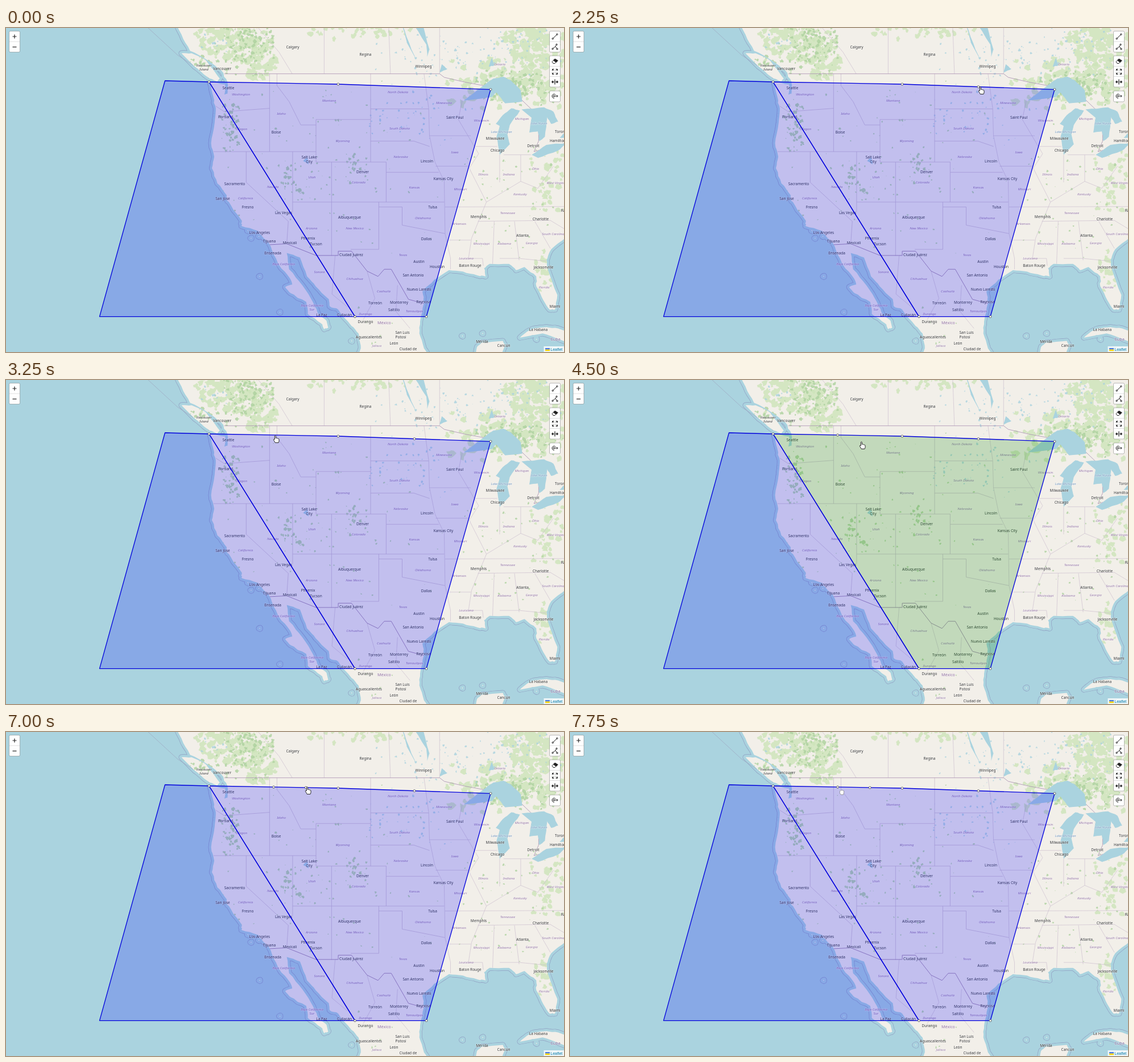
Animation, 981 px wide and 571 px high, one loop 8 s. Source, as an HTML page:

```html
<!DOCTYPE html>
<html lang="en">
<head>
<meta charset="utf-8">
<title>Map editor</title>
<style>
html, body { margin: 0; width: 100%; height: 100%; overflow: hidden; background: #aad3df; }
svg { display: block; position: absolute; left: 0; top: 0; }
text { text-anchor: middle; font-family: "Noto Sans", "Open Sans", sans-serif; }
.halo { paint-order: stroke; stroke: rgba(255,255,255,.5); stroke-width: 1.2px; stroke-linejoin: round; }
</style>
</head>
<body>
<svg id="stage" width="981" height="571" viewBox="0 0 981 571"></svg>
<script>
const stage = document.getElementById('stage');
const WATER = '#aad3df', LAND = '#f2efe9', PALE = '#cde4ba', WOOD = '#add19e';

function add(tag, attrs, parent = stage, text) {
  const node = document.createElementNS('http://www.w3.org/2000/svg', tag);
  for (const key in attrs) node.setAttribute(key, attrs[key]);
  if (text) node.textContent = text;
  return parent.appendChild(node);
}

let seed = 11;
function rnd() {
  seed = (seed * 16807) % 2147483647;
  return seed / 2147483647;
}
const spread = r => (rnd() + rnd() - 1) * r;

// Web Mercator: degrees west and north to stage pixels.
const DEG = Math.PI / 180, SCALE = 13.71;
const project = (west, north) => [
  545 + SCALE * (111.05 - west),
  235.5 + SCALE * (45.08 - Math.asinh(Math.tan(north * DEG)) / DEG),
];
const geo = s => s.trim().split(/\s+/).map(p => project(...p.split(',').map(Number)));

// Adds small natural wiggles between the given points.
function rough(pts, amp) {
  return pts.flatMap(([x, y], i) => {
    const [nx, ny] = pts[i + 1] || [x, y];
    const cuts = Math.hypot(nx - x, ny - y) > 60 ? [] : [.25, .5, .75];
    return [[x, y], ...cuts.map(k => [x + (nx - x) * k + spread(amp), y + (ny - y) * k + spread(amp)])];
  });
}
const toPath = (pts, end = '') => 'M' + pts.map(p => p.map(v => v.toFixed(1))).join('L') + end;
const regions = (list, amp) => list.split(';').map(s => toPath(rough(geo(s), amp), 'Z')).join('');
const line = (d, stroke, width, parent) => add('path', { d, fill: 'none', stroke, 'stroke-width': width, 'stroke-linejoin': 'round' }, parent);

/* ---- Land, in degrees west,north ---- */
const pacific = `129.8,54 128.3,52.2 127.2,50.9 124.9,50.1 123.2,49.3 122.4,48.3 122.4,47.3 122.8,47.2 122.7,48.1 124.7,48.35
  124.1,46.7 123.9,45.8 124.05,44.7 124.5,42.8 124.1,41.5 124.4,40.4 123.7,38.9 122.5,37.7 122.4,37.1 121.9,36.6 120.6,35.1
  120.6,34.5 118.5,34 118.3,33.7 117.2,32.8 116.6,31.7 115.8,30.3 114.4,28.8 114.1,28.1 115,27.8 114.3,27.1
  112.3,26.1 112.1,24.7 110.4,23.6 110,22.9 109.5,23.1`;
const cortez = `109.7,23.9 110.7,24.6 111.4,26 112.8,28 114.5,29.8 114.8,31.6 113.1,31.1 112.2,29 111.1,27.9 109.4,26.4
  109.3,25.6 108.2,25.2 106.5,23.3 105.6,22.4 105.3,20.6 105.6,20 105.3,19`;
const atlantic = `96.4,19.4 97.2,20.6 97.8,22.4 97.7,23.8 97.2,26 97.4,27.3 95.9,28.6 94,29.7 92.2,29.55 90.3,29.1 89.3,29
  89.5,29.9 88.8,30.4 86.3,30.4 85.4,29.7 84.3,30.05 82.8,29 82.8,27.9 81.9,26.3 81.1,25.2 80.4,25.2 80.1,26.9
  81.3,29.7 81.5,30.8 80.9,32 79,33.3 77,34.5`;
const islands = `128.3,50.7 127,50.7 125.3,50.2 124.3,49.4 123.4,48.6 123.7,48.35 125,48.75 126.6,49.6;
  84.9,21.9 84,22.6 83,23 81.5,23.15 80,23 77,22 77,20.5 79.8,21.7 82,22.4 83.4,22.2;
  90.7,19 90.4,20.8 89.8,21.3 87.1,21.5 86.8,21 87.6,19`;
const islets = geo('118.3,29 119.8,34 118.4,33.4 119.4,33.2 115.7,24.9 106.5,21.5 82.8,21.7 78.6,26.6 89.7,22.4 92.3,22.1');

const mainland = [pacific, cortez, atlantic].flatMap(s => rough(geo(s), 1.3));
const landPath = toPath([...mainland, [1020, -30]], 'Z') + regions(islands, .8)
  + islets.map(([x, y]) => `M${x - 1},${y}l2,-1v2Z`).join('');

add('rect', { width: 981, height: 571, fill: WATER });
for (const [stroke, width] of [['#8f9fc2', 10], [WATER, 8.6]])
  add('path', { d: landPath, fill: WATER, stroke, 'stroke-width': width, 'stroke-linejoin': 'round' });
line('M250,0L302,48L346,77L357,89', '#9da6c0', .7);
add('path', { d: landPath, fill: LAND });
add('path', { d: landPath }, add('clipPath', { id: 'land' }));
const cover = add('g', { 'clip-path': 'url(#land)' });

function blob(x, y, r) {
  const pts = Array.from({ length: 9 }, (_, i) => {
    const a = i * Math.PI * 2 / 9, d = r * (.4 + rnd() * .8);
    return [x + Math.cos(a) * d, y + Math.sin(a) * d];
  });
  return toPath(pts, 'Z');
}
// Fills elliptical zones "x y rx ry" with blobs; share is the covered part.
function scatter(fill, size, share, zones) {
  for (const zone of zones.split(';')) {
    const [x, y, rx, ry] = zone.trim().split(' ').map(Number);
    let d = '';
    for (let n = rx * ry * share / size ** 2; n > 0; n--)
      d += blob(x + spread(rx), y + spread(ry), size * (.3 + rnd()));
    add('path', { d, fill, opacity: .8 }, cover);
  }
}
scatter(PALE, 7, 1.4, '400 15 75 48;445 55 40 50;900 95 130 50;930 25 80 55');
scatter(PALE, 5, .5, '640 2 120 18;950 270 40 60;948 430 25 45');
scatter(WOOD, 3, .35, '425 30 60 60;900 105 90 35;393 172 22 60;491 272 14 36;612 246 18 30;518 287 16 18;340 60 24 20');
scatter(WOOD, 2, .012, '555 245 190 170;860 300 130 150;405 305 45 60;650 530 50 45');
scatter(WATER, 2, .04, '790 40 170 60;350 22 48 30;905 30 75 45;720 150 100 60');

/* ---- Lakes ---- */
const lakes = `92.1,46.7 89.6,48 88.3,48.6 87,48.75 86,48.4 84.8,47.6 84.6,46.6 86.8,46.45 87.9,47.4 88.5,47 90.8,46.8;
  87.5,41.7 87.9,43.4 87.5,44.4 88,44.6 87.1,45.4 86,46 84.9,45.8 86.2,44.5 86.5,43.6 86.2,42.7;
  84.7,45.9 81.8,46.1 80.6,45.7 80,44.8 80.9,44.6 81.4,45.2 81.7,43.4 82.4,43 82.6,43.9 83.7,43.8 83.4,45.2;
  83.4,41.7 81.5,42.65 79,42.8 80,42.1 82.6,41.4;
  79.8,43.3 79.3,43.7 77,44 77,43.3;
  96.8,50.4 96.9,51.4 99,53.5 97.6,53.5 96.5,51;98.3,50.3 98.8,51 100,53 99.4,51.6;
  95.2,49.1 94.2,49.4 94.9,49.8;112.7,41.1 112,40.8 112.2,41.6;88.9,49.6 88.2,49.7 88.5,50.3`;
add('path', { d: regions(lakes, .8), fill: WATER });

/* ---- Borders ---- */
const borders = (list, stroke, width) => list.split(';').forEach(s => line(toPath(geo(s)), stroke, width, cover));
const STATE = '#c6b7c9', NATION = '#a78fb0';
const western = `117,49 117,42;124.2,42 111.05,42;104.05,45 111.05,45 111.05,41 102.05,41 102.05,37;104.05,49 104.05,41;
  104.05,45.95 96.6,45.95;104.05,43 98.5,43 96.5,42.5;109.05,41 109.05,31.3;114.05,42 114.05,36;114.05,37 94.6,37;
  102.05,40 95.3,40;120,42 120,39 114.6,35 114.8,32.6;103,37 103,32 106.6,32;103,36.5 100,36.5 100,34.6 94.5,33.7;
  123.9,46.2 122.8,45.7 119,45.9 117,46;116.05,49 116.05,48 114.5,46.6 113,44.5 111.05,44.5`;
const eastern = `97.2,49 96.6,46 96.5,43.5 91.2,43.5;96.5,43.5 95.8,41 94.6,39.1 94.5,33.7 93.8,31 93.8,29.8;
  92.3,46.7 92.8,45 90.2,41.8 91.4,40.4 89.2,37 91.1,33.2 91.5,31 89.7,31 89.6,30.2;95.7,40.6 91.5,40.6;94,33 91.2,33;
  90.6,42.5 87.8,42.5;87.5,41.7 87.5,39;84.8,41.7 84.8,39.1;87,41.7 83.5,41.7;89.2,37 84.8,39.1 82.6,38.4 80.6,40.6;
  94.5,36.5 76,36.55;90.3,35 81,35.1 78.6,33.9;88.2,35 88.4,30.4;85.6,35 85,30.8;87.5,31 85,31 81.5,30.7;83,35 81,32.1`;
const outer = `120,53.8 115.8,50.8 114.1,49;110,54 110,49;101.5,49 101.8,54;95.2,49 95.2,52.8;
  108.6,31.3 109,27 107,25.5;104.5,29.6 103.5,26.5 105,24;100.6,28 100.8,25 99,23`;
borders(western, STATE, .7);
borders(eastern, STATE, .6);
borders(outer, STATE, .6);
borders('122.8,49 95.2,49 94.6,48.7 92,48.3 89.6,48 88.4,48.3 84.9,46.9 82.5,45.3 82.5,43 83.1,42 79,42.8', NATION, .8);
borders('117.1,32.5 114.8,32.6 111.05,31.33 108.2,31.33 108.2,31.8 106.5,31.8 104.5,29.6 103.1,29 102.3,29.8 101.4,29.8 99.2,26.4 97.2,25.9', NATION, 1);

/* ---- Labels ---- */
function labels(list, attrs) {
  for (const entry of list.split(';')) {
    const [, name, x, y] = entry.trim().match(/^(.+) (\S+) (\S+)$/);
    add('text', { x, y: +y + 2.3, class: 'halo', ...attrs }, stage, name);
  }
}
const italic = (fill, size) => ({ fill, 'font-size': size, 'font-style': 'italic' });
labels(`Washington 413 117;Oregon 414 178;Idaho 484 151;Montana 568 128;North Dakota 689 113;South Dakota 692 177;
  Minnesota 770 132;Wisconsin 836 163;Michigan 907 160;Ontario 868 64;Wyoming 592 199;Nebraska 694 227;Iowa 789 219;
  Utah 538 263;Colorado 620 272;Nevada 469 280;California 421 300;Kansas 718 281;Missouri 799 284;Illinois 839 258;
  Indiana 884 258;Ohio 931 248;Kentucky 904 293;Tennessee 882 326;West Virginia 968 273;Oklahoma 733 335;
  Arkansas 797 345;Arizona 537 353;New Mexico 613 353;Texas 698 400;Mississippi 836 380;Alabama 876 380;Georgia 924 379;
  South Carolina 962 363;Louisiana 809 406;Florida 946 457;Baja California 488 416;Baja California 538 489;Sur 538 496;
  Sonora 551 430;Chihuahua 613 442;Coahuila 664 464;Tamaulipas 718 499;Durango 632 504;Jalisco 652 560`, italic('#8f6f9f', 6));
labels('Lake Michigan 871 183;Lake Huron 937 168', italic('#6f93bb', 5.8));
labels('Vancouver 348 66;Island 348 73', italic('#333', 5.8));
labels('México 665 520;Cuba 966 549', { fill: '#8d6b9d', 'font-size': 7.2 });
labels(`Calgary 504 34;Regina 632 46.5;Winnipeg 734 68;Vancouver 380 72;Seattle 391 106;Portland 386 157;Boise 475 184;
  Salt Lake 533 228;City 533 236;Denver 627 254;Sacramento 402 275;San Jose 381 301;Fresno 425 316;Las Vegas 488 326;
  Los Angeles 446 361;Tijuana 463 376;Mexicali 499 379;Ensenada 469 397;Phoenix 531 371;Tucson 545 381;
  Albuquerque 604 334;Ciudad Juárez 607 400;Lincoln 740 235;Kansas City 769 266;Tulsa 750 316;Dallas 739 372;
  Austin 726 412;Houston 758 421;San Antonio 716 436;Nuevo Laredo 726 461;Monterrey 691 484;Reynosa 734 483;
  Saltillo 682 497;Torreón 649 485;Durango 632 518;La Paz 555 506;Culiacán 595 506;Aguascalientes 638 545;
  San Luis 697 537;Potosí 694 545;León 682 556;Ciudad de 707 566;Saint Paul 789 158;Milwaukee 860 195;Chicago 864 216;
  Detroit 927 208;Toronto 977 183;Hamilton 970 199;Memphis 831 333;Charlotte 940 337;Atlanta 908 366;Raleigh 987 322;
  Baton Rouge 816 419;Jacksonville 945 422;Miami 965 491;La Habana 936 532;Mérida 837 553;Cancún 875 560`,
  { fill: '#333', 'font-size': 6.5 });

/* ---- Editable shapes ---- */
const NW = [357, 95], MID = [584, 99], NE = [852, 108.3], SE = [739, 508.7], SW = [613.5, 508.7];
const shape = pts => add('polygon', { points: pts.join(' '), fill: '#00f', 'fill-opacity': .2, stroke: '#0000dc', 'stroke-width': 1.3, 'stroke-linejoin': 'round' });
const vertex = ([x, y]) => add('rect', { x: x - 1.8, y: y - 1.8, width: 3.6, height: 3.6, rx: 1.3, fill: '#fff', stroke: '#444', 'stroke-width': .8 });
const between = (a, b) => a.map((v, i) => (v + b[i]) / 2);

shape([[279.5, 93], NW, SW, [164.5, 508.7]]);
const area = shape([NW, MID, NE, SE, SW]);
[NW, MID, NE, SE, SW].forEach(vertex);
const half = between(NW, MID);
const inserted = [[1750, between(MID, NE)], [3500, half], [6000, between(half, MID)]]
  .map(([time, at]) => ({ time, node: vertex(at) }));

/* ---- Controls ---- */
function bar(x, y, cells) {
  add('rect', { x: x - .5, y: y - .5, width: 19, height: cells * 18 + 1, rx: 2, fill: '#fff', stroke: 'rgba(0,0,0,.25)' });
  for (let i = 1; i < cells; i++) line(`M${x},${y + i * 18}h18`, '#ccc', .6);
}
function icon(x, y, d, dots = [], width = 1) {
  const g = add('g', { transform: `translate(${x} ${y})`, fill: 'none', stroke: '#222', 'stroke-width': width });
  add('path', { d }, g);
  for (const [cx, cy] of dots) add('circle', { cx, cy, r: 1.2, fill: '#fff' }, g);
  return g;
}
bar(6, 6, 2);
bar(956, 6, 2);
bar(956, 49.5, 3);
bar(956, 111.5, 1);
icon(15, 15, 'M-3.5,0h7M0,-3.5v7', [], 1.2);
icon(15, 33.5, 'M-3.5,0h7', [], 1.2);
icon(965, 15, 'M-3.5,3.5l7,-7', [[-3.8, 3.8], [3.8, -3.8]]);
icon(965, 33, 'M-4,3.5L1,-.5L3,-4M1,-.5L4,4', [[-4, 3.8], [3, -3.8], [4, 4]]);
const eraser = icon(965, 58.5, 'M-5,1L0,-4L5,-1L0,4H-3Z');
add('path', { d: 'M0,-4L5,-1L2,2L-2.5,-1.5Z', fill: '#222' }, eraser);
const frame = icon(965, 77, '');
for (let turn = 0; turn < 360; turn += 90)
  add('path', { d: 'M-4.5,-1.5v-3h3M-4,-4l2.5,2.5', transform: `rotate(${turn})` }, frame);
icon(965, 95, 'M0,-4.5v9M-5,0h3.5M1.5,0h3.5M-3.2,-2l-2,2l2,2M3.2,-2l2,2l-2,2', [], 1.3);
icon(965, 120, 'M-1,3.6A3.6,3.6 0 1 1 1.5,-2M-1.5,0H5M3.2,-2l2,2l-2,2', [[-1.8, 0]]);

add('rect', { x: 945.5, y: 561, width: 36, height: 10, fill: '#fff', opacity: .8 });
add('rect', { x: 948, y: 564, width: 8, height: 2.6, fill: '#4c7be1' });
add('rect', { x: 948, y: 566.6, width: 8, height: 2.6, fill: '#ffd500' });
add('text', { x: 967.8, y: 569, fill: '#0078a8', 'font-size': 7, style: 'font-family: "Liberation Sans", Arial, sans-serif' }, stage, 'Leaflet');

/* ---- Pointer ---- */
const cursor = add('g', { stroke: '#111', 'stroke-width': .9, 'stroke-linejoin': 'round', fill: '#fff' });
const hand = add('path', { d: 'M-2.6,1V-5.5Q-1.6,-7 -.6,-5.5V-1.5Q.6,-2.4 1.4,-1.2Q2.6,-1.8 3.3,-.6Q4.8,-1 5,.6V3.5Q4.8,5 4,6.5H-1.8Q-2.4,4.8 -4.6,1.6Q-4.9,0 -3.4,.2Z' }, cursor);
const fist = add('path', { d: 'M-3,-2.4Q-2.2,-4 -1.2,-3Q-.3,-4.2 .7,-3Q1.8,-3.9 2.4,-2.6Q3.8,-2.8 3.6,-.8Q3.6,1.6 2.4,4.5H-1.8Q-4,1.8 -3.8,.2Z', stroke: '#666', 'stroke-width': .6 }, cursor);

// Stops of the pointer: time, x, y, and the sag of the way leading there.
const stops = [
  [250, 930, 118, 0], [1250, 724, 111, 8], [1500, 723, 110, 0], [2250, 723, 110, 0], [3250, 475, 104, 14],
  [4000, 475, 104, 0], [4500, 514, 115, 0], [5750, 531, 103, 3], [7000, 531, 103, 0], [7750, 478, 106, 4],
];
const STEP = 250, GRAB = 7750;

function pointer(t) {
  const i = stops.findIndex(s => s[0] >= t);
  const [t1, x1, y1, sag] = stops[i], [t0, x0, y0] = stops[Math.max(i - 1, 0)];
  const k = t1 > t0 ? (t - t0) / (t1 - t0) : 1;
  const ease = k * (2 - k);
  return [x0 + (x1 - x0) * ease, y0 + (y1 - y0) * ease + sag * Math.sin(Math.PI * k)];
}
// The finger tip must lie below the upper edge of the area.
function hovers(x, y) {
  const [a, b] = x < MID[0] ? [NW, MID] : [MID, NE];
  const edge = a[1] + (b[1] - a[1]) * (x - a[0]) / (b[0] - a[0]);
  return x < NE[0] - 5 && y - 6.5 > edge + .6;
}
const show = (node, on) => node.setAttribute('visibility', on ? 'visible' : 'hidden');

function draw() {
  const t = Math.floor(performance.now() % 8000 / STEP) * STEP;
  const [x, y] = pointer(t), visible = t >= STEP, grabs = t >= GRAB;
  area.setAttribute('fill', visible && !grabs && hovers(x, y) ? '#008000' : '#00f');
  cursor.setAttribute('transform', `translate(${x} ${y})`);
  show(hand, visible && !grabs);
  show(fist, grabs);
  for (const { time, node } of inserted) show(node, t >= time);
  requestAnimationFrame(draw);
}
draw();
</script>
</body>
</html>
```
